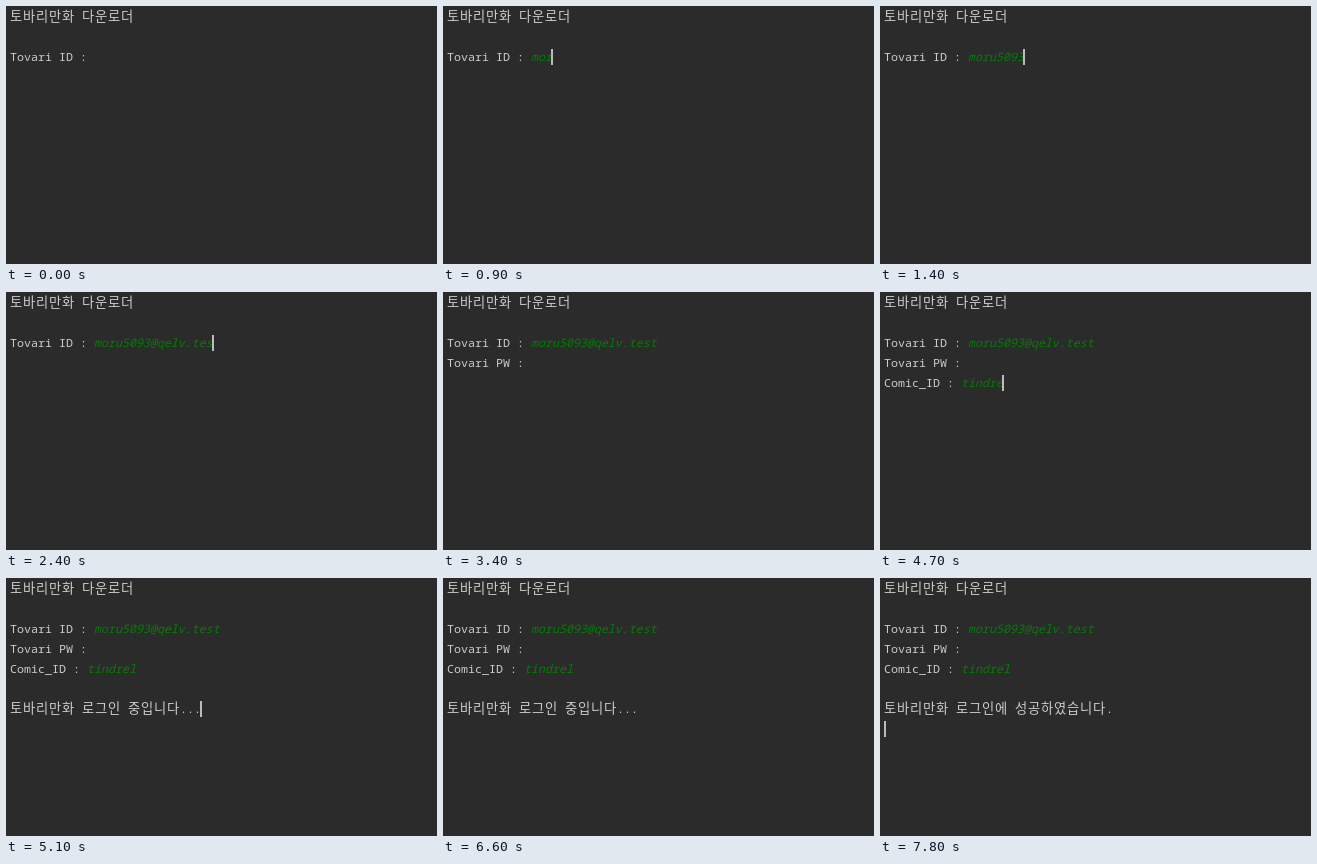
Write an HTML page that moves like this. It is 431 px wide and 258 px high and loops after 8000 ms.

```html
<!DOCTYPE html>
<html lang="ko">
<head>
<meta charset="utf-8">
<title>Console</title>
<style>
  html, body { margin: 0; width: 100%; height: 100%; overflow: hidden; background: #2b2b2b; }
  svg { display: block; width: 431px; height: 258px; }
  text { font: 11.667px "Noto Sans Mono", monospace; fill: #ccc; white-space: pre; }
  .ko { font: 13.27px "Noto Sans CJK KR", "Noto Sans CJK", sans-serif; letter-spacing: .06em; }
  .in { font-style: italic; fill: #007f00; }
  rect { fill: #bbb; }
</style>
</head>
<body>
<svg viewBox="0 0 431 258"><g id="lines"></g><rect id="caret" width="2" height="16"/></svg>
<script>
const LOOP = 8000, TICK = 100, BLINK = 460, BLINK_DELAY = 90;
const LEFT = 4, TOP = 3, ROW = 20;

// enter: the caret reaches the row; from, to: the text is shown.
// Each burst types `count` characters at an even pace.
const lines = [
  { row: 0, text: '토바리만화 다운로더' },
  { row: 2, text: 'Tovari ID : ', enter: -850, input: 'moru5093@qelv.test', bursts: [
    { start: 800, end: 1000, count: 4 },
    { start: 1200, end: 1400, count: 4 },
    { start: 1700, end: 2500, count: 10 }
  ] },
  { row: 3, text: 'Tovari PW : ', enter: 2600, from: 2800 },
  { row: 4, text: 'Comic_ID : ', enter: 3900, from: 4100, input: 'tindrel', bursts: [
    { start: 4200, end: 4300, count: 3 },
    { start: 4500, end: 4800, count: 4 }
  ] },
  { row: 5, text: '', enter: 4900 },
  { row: 6, text: '토바리만화 로그인 중입니다...', enter: 5100, from: 5100, to: 7800 },
  { row: 6, text: '토바리만화 로그인에 성공하였습니다.', from: 7800 },
  { row: 7, text: '', enter: 7800 }
];

const linesEl = document.getElementById('lines');
const caretEl = document.getElementById('caret');

const progress = ({ start, end }, t) =>
  Math.min(1, Math.max(0, (t - start + TICK) / (end - start + TICK)));

function typed({ input = '', bursts = [] }, t) {
  const count = bursts.reduce((n, b) => n + Math.round(b.count * progress(b, t)), 0);
  return input.slice(0, count);
}

const width = s => [...s].reduce((w, c) => w + (/[가-힣]/.test(c) ? 13 : 7), 0);

const markup = (line, t) =>
  `<text x="${LEFT}" y="${TOP + 12 + line.row * ROW}">` +
  line.text.replace(/[가-힣]+/g, '<tspan class="ko">$&</tspan>') +
  `<tspan class="in">${typed(line, t)}</tspan></text>`;

// The caret starts a new blink cycle whenever its line changes.
function lastChange({ enter, from = enter, bursts = [] }, t) {
  const keys = bursts.filter(b => b.start <= t).map(b => Math.min(b.end, t));
  return Math.max(enter, from <= t ? from : enter, ...keys);
}

function drawCaret(t) {
  const line = lines.filter(l => l.enter <= t).pop();
  const { from = 0 } = line;
  const end = t >= from ? width(line.text + typed(line, t)) : 0;
  const idle = t - lastChange(line, t) - BLINK_DELAY;
  const off = idle > 0 && Math.floor(idle / BLINK) % 2;
  caretEl.setAttribute('x', Math.max(LEFT, LEFT + end - 1));
  caretEl.setAttribute('y', TOP + line.row * ROW);
  caretEl.style.display = off ? 'none' : '';
}

let shown = '';

function draw() {
  const t = Math.floor(performance.now() % LOOP / TICK) * TICK;
  const html = lines
    .filter(({ from = 0, to = LOOP }) => t >= from && t < to)
    .map(line => markup(line, t)).join('');
  if (html !== shown) linesEl.innerHTML = shown = html;
  drawCaret(t);
  requestAnimationFrame(draw);
}
draw();
</script>
</body>
</html>
```
